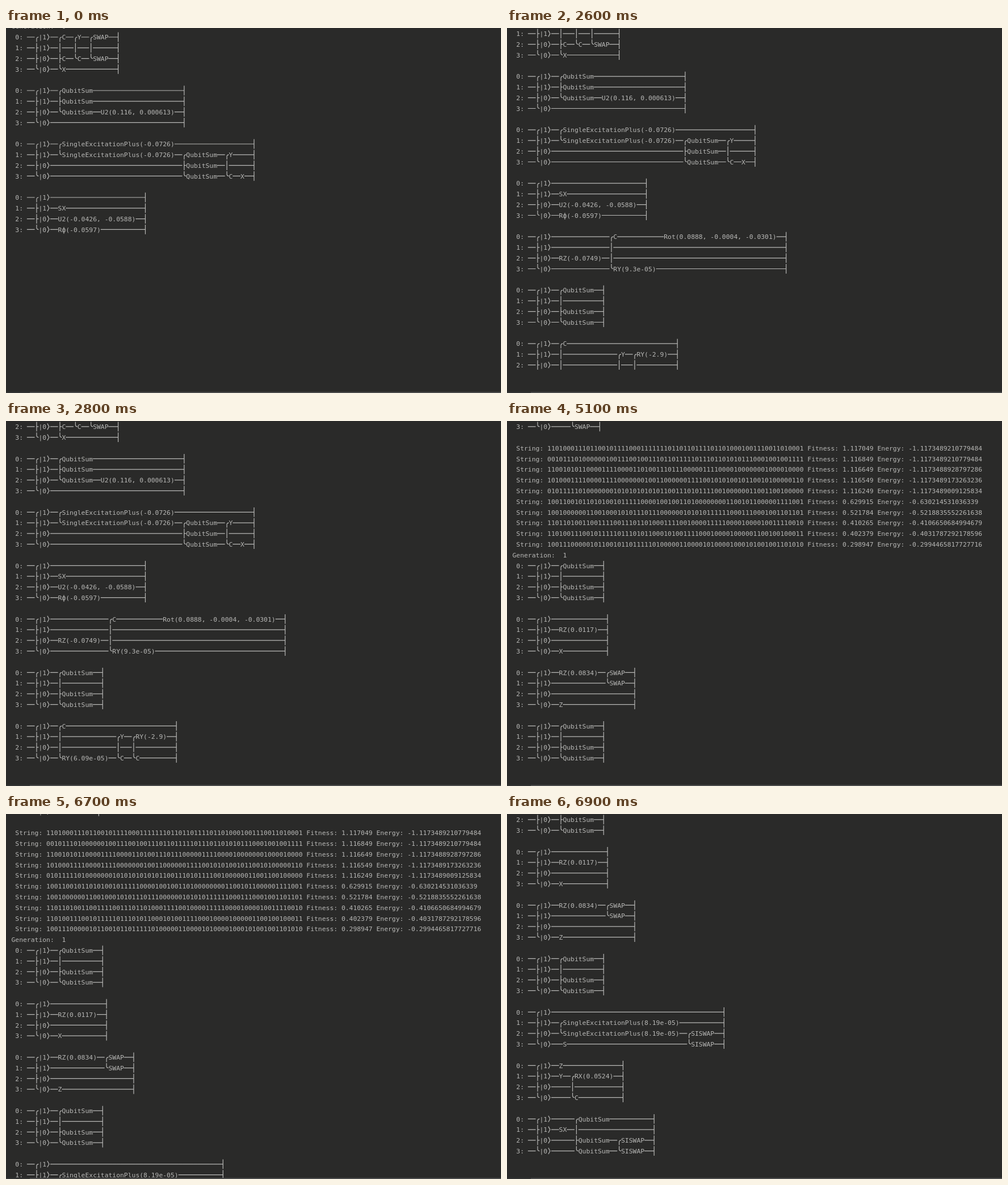
Write an HTML page with a canvas that moves like this. It is 872 px wide and 642 px high and loops after 8 s.

```html
<!DOCTYPE html>
<html lang="en">
<head>
<meta charset="utf-8">
<title>Circuit search console</title>
<style>
  html, body { margin: 0; width: 100%; height: 100%; overflow: hidden; background: #2a2a29; }
  canvas { display: block; }
</style>
</head>
<body>
<canvas id="stage" width="872" height="642"></canvas>
<script>
const ctx = document.getElementById('stage').getContext('2d');
const LEFT = 9.5, CELL = 6.84, PITCH = 18.8, REACH = 8.4;
const LOOP = 8000;

const wire = n => '─'.repeat(n);
const row = (i, width, body = '') =>
  ` ${i}: ──${'╭├├╰'[i]}|${i < 2 ? 1 : 0}⟩${body.padEnd(width, '─')}┤`;
const circuit = (width, ...bodies) => [...bodies.map((b, i) => row(i, width, b)), ''];
const result = (bits, fitness, energy) => ` String: ${bits} Fitness: ${fitness} Energy: ${energy}`;

const sum = circuit(13, '──╭QubitSum', '──│', '──├QubitSum', '──╰QubitSum');
const plus = 'SingleExcitationPlus';

const first = [
  'Generation:  0',
  ...circuit(17, '──╭C──╭Y──╭SWAP', '──│───│───│', '──├C──╰C──╰SWAP', '──╰X'),
  ...circuit(34, '──╭QubitSum', '──├QubitSum', '──╰QubitSum──U2(0.116, 0.000613)', ''),
  ...circuit(52, `──╭${plus}(-0.0726)`, `──╰${plus}(-0.0726)──╭QubitSum──╭Y`,
    wire(34) + '├QubitSum──│', wire(34) + '╰QubitSum──╰C──X'),
  ...circuit(24, '', '──SX', '──U2(-0.0426, -0.0588)', '──Rϕ(-0.0597)'),
  ...circuit(60, `${wire(15)}╭C${wire(12)}Rot(0.0888, -0.0004, -0.0301)`, wire(15) + '│',
    '──RZ(-0.0749)──│', wire(15) + '╰RY(9.3e-05)'),
  ...sum,
  ...circuit(32, '──╭C', `──│${wire(14)}╭Y──╭RY(-2.9)`, `──│${wire(14)}│───│`,
    '──╰RY(6.09e-05)──╰C──╰C'),
];

const second = [
  row(2, 12, '─────│'),
  row(3, 12, '─────╰SWAP'),
  '',
  result('110100011101100101111000111111101101101111011010001001110011010001', '1.117049', '-1.1173489210779484'),
  result('001011101000000100111001001110110111110111011010101110001001001111', '1.116849', '-1.1173489210779484'),
  result('110010101100001111000011010011101110000011110000100000001000010000', '1.116649', '-1.1173488928797286'),
  result('101000111100001111000000010011000000111100101010010110010100000110', '1.116549', '-1.1173489173263236'),
  result('010111110100000001010101010101100111010111100100000011001100100000', '1.116249', '-1.1173489009125834'),
  result('100110010110101001011111000010010011010000000011001011000001111001', '0.629915', '-0.630214531036339'),
  result('100100000011001000101011101110000001010101111110001110001001101101', '0.521784', '-0.5218835552261638'),
  result('110110100110011110011101101000111100100001111100001000010011110010', '0.410265', '-0.4106650684994679'),
  result('110100111001011111011101011000101001111000100001000001100100100011', '0.402379', '-0.4031787292178596'),
  result('100111000001011001011011111010000011000010100001000101001001101010', '0.298947', '-0.2994465817727716'),
  'Generation:  1',
  ...sum,
  ...circuit(14, '', '──RZ(0.0117)', '', '──X'),
  ...circuit(21, '──RZ(0.0834)──╭SWAP', wire(14) + '╰SWAP', '', '──Z'),
  ...sum,
  ...circuit(44, '', `──╭${plus}(8.19e-05)`, `──╰${plus}(8.19e-05)──╭SISWAP`,
    `───S${wire(31)}╰SISWAP`),
  ...circuit(18, '──Z', '──Y──╭RX(0.0524)', '─────│', '─────╰C'),
  ...circuit(26, '──────╭QubitSum', '──SX──│', '──────├QubitSum──╭SISWAP',
    '──────╰QubitSum──╰SISWAP'),
];

// Console output arrives in bursts: start time, text, y of line 0, lines printed
const states = [
  [0, first, -2.8, 21],
  [700, first, -2.8, 31],
  [2600, first, -27.7, 34],
  [2800, first, -46.5, 36],
  [5000, second, 5.5, 34],
  [5100, second, -8.9, 34],
  [6700, second, -23.4, 49],
  [6800, second, -196.9, 49],
  [6900, second, -290.9, 49],
];

function drawGlyph(ch, x, y) {
  const mid = x + CELL / 2, right = x + CELL;
  const line = (x1, y1, x2, y2) => { ctx.moveTo(x1, y1); ctx.lineTo(x2, y2); };
  const corner = dir => {
    line(mid, y + dir * REACH, mid, y + dir * 3.4);
    ctx.quadraticCurveTo(mid, y, right, y);
  };
  if ('│├┤'.includes(ch)) line(mid, y - REACH, mid, y + REACH);
  if (ch === '─') line(x, y, right, y);
  else if (ch === '├') line(mid, y, right, y);
  else if (ch === '┤') line(x, y, mid, y);
  else if (ch === '╭') corner(1);
  else if (ch === '╰') corner(-1);
  else if (ch === '⟩') {
    line(x + 1.8, y - 5.5, x + 4.8, y);
    ctx.lineTo(x + 1.8, y + 5.5);
  } else if (ch !== '│' && ch !== ' ') ctx.fillText(ch, x, y + 4.2);
}

function draw([, lines, top, count]) {
  ctx.fillStyle = '#2a2a29';
  ctx.fillRect(0, 0, 872, 642);
  ctx.font = '11.37px "DejaVu Sans Mono", monospace';
  ctx.fillStyle = ctx.strokeStyle = '#b8b8b6';
  ctx.lineWidth = 1.2;
  ctx.beginPath();
  lines.slice(0, count).forEach((text, i) => {
    const y = top + i * PITCH;
    if (y > -12 && y < 654) [...text].forEach((ch, col) => drawGlyph(ch, LEFT + col * CELL, y));
  });
  ctx.stroke();
  ctx.fillStyle = '#333434';
  ctx.fillRect(0, 640, 872, 2);
  ctx.fillStyle = '#4a4b4b';
  ctx.fillRect(42, 640, 830, 2);
}

let shown;
function tick() {
  const t = performance.now() % LOOP;
  const state = states.findLast(s => s[0] <= t);
  if (state !== shown) draw(shown = state);
  requestAnimationFrame(tick);
}
tick();
</script>
</body>
</html>
```
